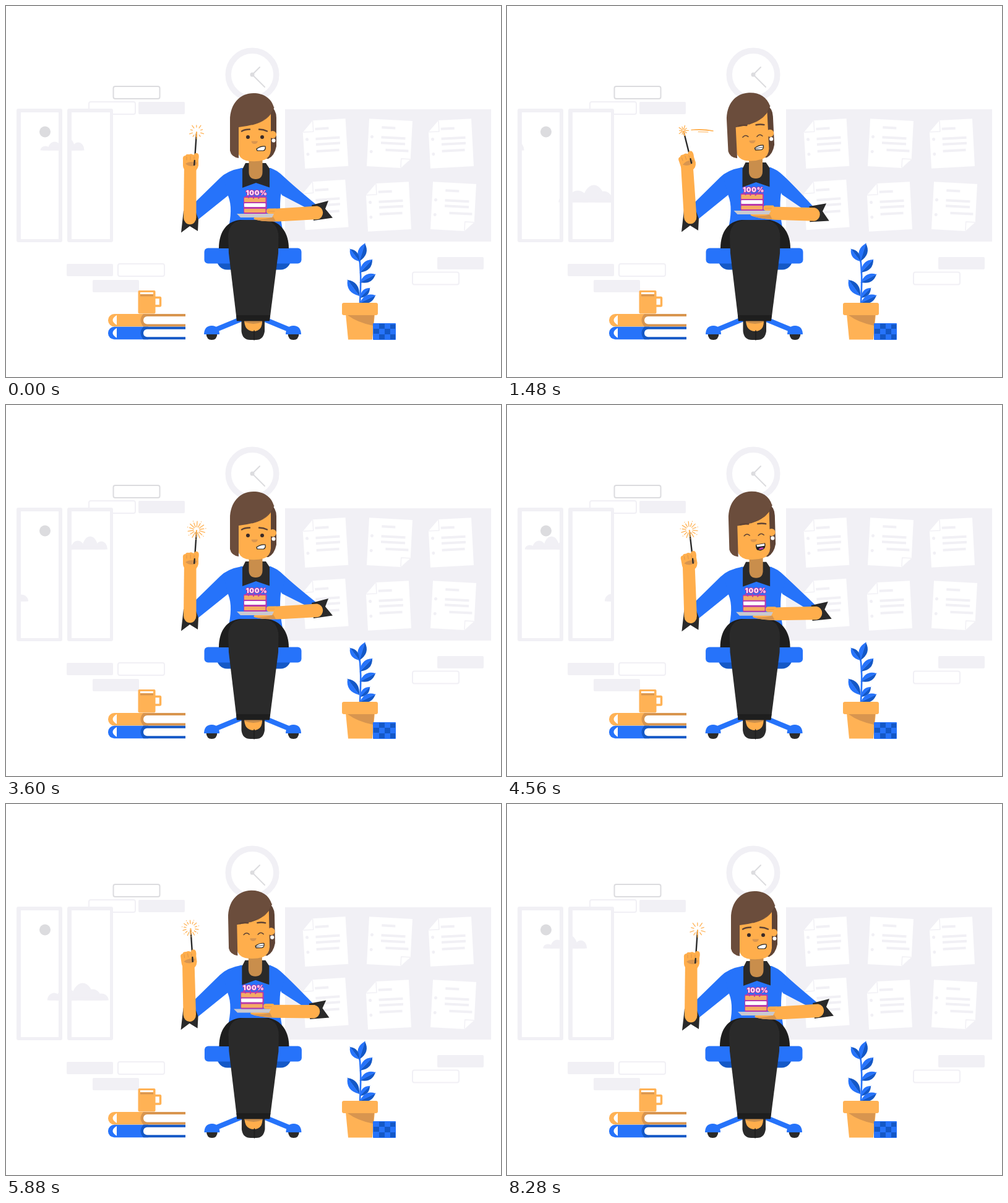
Write an HTML page with a canvas that moves like this. It is 800 px wide and 600 px high and loops after 8.32 s.

```html
<!DOCTYPE html>
<html lang="en">
<head>
<meta charset="utf-8">
<title>Office celebration</title>
<style>
html, body { margin: 0; width: 100%; height: 100%; overflow: hidden; background: #fff; }
canvas { display: block; width: 800px; height: 600px; }
</style>
</head>
<body>
<canvas id="stage" width="800" height="600"></canvas>
<script>
const ctx = document.getElementById('stage').getContext('2d');
const CYCLE = 4160, STEP = 40;
const PALE = '#f1f0f5', GREY = '#dcdcdf', BLUE = '#2673fa', NAVY = '#1458c6';
const BLACK = '#2a2a2a', DARK = '#1e1e1e', SKIN = '#ffae4c', SHADE = '#c98e4c';
const ORANGE = '#ffb255', TAN = '#d8954f', HAIR = '#6b4d3c', HAIR2 = '#5e4335', PINK = '#b93aab';

// ---- helpers ----
function fill(d, color) { ctx.fillStyle = color; ctx.fill(new Path2D(d)); }
function line(d, color, w, cap = 'round') {
  ctx.strokeStyle = color; ctx.lineWidth = w; ctx.lineCap = cap; ctx.lineJoin = 'round';
  ctx.stroke(new Path2D(d));
}
function box(x, y, w, h, color, r = 0) {
  ctx.beginPath(); ctx.roundRect(x, y, w, h, r); ctx.fillStyle = color; ctx.fill();
}
function frame(x, y, w, h, color, lw, r = 0) {
  ctx.beginPath(); ctx.roundRect(x, y, w, h, r);
  ctx.strokeStyle = color; ctx.lineWidth = lw; ctx.stroke();
}
function dot(x, y, r, color) {
  ctx.beginPath(); ctx.arc(x, y, r, 0, 7); ctx.fillStyle = color; ctx.fill();
}
function group(x, y, draw) { ctx.save(); ctx.translate(x, y); draw(); ctx.restore(); }
function turn(deg, x, y) {
  ctx.translate(x, y); ctx.rotate(deg * Math.PI / 180); ctx.translate(-x, -y);
}
// eased interpolation through [time, value] pairs
function ease(t, keys) {
  if (t <= keys[0][0]) return keys[0][1];
  for (let i = 1; i < keys.length; i++) {
    const [a, u] = keys[i - 1], [b, v] = keys[i];
    if (t <= b) { const k = (t - a) / (b - a); return u + (v - u) * k * k * (3 - 2 * k); }
  }
  return keys[keys.length - 1][1];
}
const lean = (s, left, right) => s < 0 ? -s * left : s * right;

// ---- room ----
function paper(x, y, deg, topFold) {
  group(x, y, () => {
    turn(deg, 0, 0);
    fill(topFold ? 'M-18-39H35V38H-35V-21Z' : 'M-35-38H35V24L20 39H-35Z', '#fff');
    line(topFold ? 'M-18-38V-21H-34' : 'M34 24H20V38', PALE, 1.5);
    const left = topFold ? -15 : -14;
    [[-25, 22], [-9, 39], [0, 39], [11, 37]].forEach(([ly, w], i) => {
      box(left + (i === 3 && !topFold ? 8 : 0), ly - 2, w, 4, PALE);
    });
    dot(-29, -9, 2.5, PALE); dot(-29, 15, 2.5, PALE);
  });
}

function cloud(x, y, bumps, width) {
  ctx.fillStyle = PALE;
  for (const [bx, rx, ry] of bumps) {
    ctx.beginPath(); ctx.ellipse(x + bx, y, rx, ry, 0, Math.PI, 2 * Math.PI); ctx.fill();
  }
  box(x + 3, y - 5, width - 6, 5, PALE, [3, 3, 0, 0]);
}

function windows(t) {
  box(17, 166, 74, 216, PALE, 3);
  box(99, 166, 74, 216, PALE, 3);
  box(24, 172, 61, 205, '#fff');
  box(106, 172, 62, 205, '#fff');
  ctx.save();
  ctx.beginPath(); ctx.rect(24, 172, 61, 205); ctx.rect(106, 172, 62, 205); ctx.clip();
  dot(63, 203.5, 9, GREY);
  cloud(185.5 - 0.069 * t, 317.5, [[11, 11, 12], [31, 17, 19], [57, 18, 28], [73, 15, 18], [87, 12, 11]], 99);
  const late = t < 2080 ? t + CYCLE : t;
  cloud(93 - 0.0668 * (late - 3600), 233.5, [[8, 8, 7], [23, 11, 14], [43, 13, 21], [61, 10, 13]], 71);
  ctx.restore();
}

function room(t) {
  frame(173.5, 130, 75, 20, GREY, 2, 3);
  frame(134, 155, 75, 20, PALE, 2, 3);
  box(214, 155, 75, 20, PALE, 2);
  box(98, 417, 75, 20, PALE, 2);
  frame(181, 417, 75, 20, PALE, 2, 3);
  box(140, 443, 75, 20, PALE, 2);
  box(697, 406, 75, 20, PALE, 2);
  frame(657, 430.5, 75, 20, PALE, 2, 3);
  windows(t);

  ctx.beginPath(); ctx.arc(398, 111, 38.8, 0, 7);
  ctx.strokeStyle = PALE; ctx.lineWidth = 9.5; ctx.stroke();
  line('M410 99L398 111L418 131', GREY, 2);
  dot(398, 111, 3.5, GREY);

  box(451, 167, 333, 214, PALE);
  paper(516, 223, -3.5, true);
  paper(620, 222, 3, false);
  paper(719, 223, -3, true);
  paper(516, 322, -4, true);
  paper(618, 325, -3, true);
  paper(723, 324, 3, false);
}

function book(y, main, shade) {
  box(165, y, 65, 20.5, main, [10, 0, 0, 10]);
  fill(`M222 ${y}H290V${y + 20.5}H222Q213 ${y + 10} 222 ${y}Z`, shade);
  box(222, y + 4, 68, 12.5, '#fff', [6, 0, 0, 6]);
  fill(`M179 ${y + 2}Q166 ${y + 10} 179 ${y + 18}Z`, '#fff');
}

function leaf(x, y, u, v) {
  const nx = (y - v) * 0.45, ny = (u - x) * 0.45, mx = x + (u - x) * 0.55, my = y + (v - y) * 0.55;
  fill(`M${x} ${y}Q${mx + nx} ${my + ny} ${u} ${v}Z`, NAVY);
  fill(`M${x} ${y}Q${mx - nx} ${my - ny} ${u} ${v}L${x} ${y}Z`, BLUE);
  line(`M${x} ${y}L${u} ${v}`, BLUE, 1);
}

function props() {
  book(498, ORANGE, TAN);
  book(518.8, BLUE, NAVY);
  box(213.5, 460, 28, 37.5, ORANGE, 2);
  box(217, 463, 21, 3, '#fff');
  box(217, 466.5, 21, 3, TAN);
  frame(239, 471.5, 10.5, 13.5, ORANGE, 3.5, 1);

  line('M572 481C573 455 575 430 570 400', BLUE, 2.6);
  leaf(571, 413, 580, 384);
  leaf(571, 413, 556, 393);
  leaf(572, 431, 592, 410);
  leaf(572, 447, 597, 434);
  leaf(571, 469, 552, 443);
  leaf(572, 472, 588, 456);
  leaf(572, 480, 597, 468);
  fill('M549 498H596L592 539.5H553Z', ORANGE);
  fill('M552 500H595L593.5 517Q568 512 552 500Z', TAN);
  box(543, 480, 58, 20, ORANGE, 3);

  box(593, 513, 37, 27, BLUE, 1);
  for (const [x, y, w, h] of [[603, 514, 9, 8], [612, 522, 9, 9], [594, 522, 9, 8], [603, 531, 9, 8], [621, 515, 8, 7], [621, 531, 8, 8]])
    box(x, y, w, h, NAVY);
}

// ---- character ----
function chair() {
  box(341, 408, 119, 18.5, NAVY, [0, 0, 16, 16]);
  box(320.5, 391.5, 157, 25, BLUE, 6);
  line('M340 523L386 504M457 523L411 504', BLUE, 8);
  for (const x of [332.5, 464.5]) {
    fill(`M${x - 9} 530H${x + 9}Q${x + 8.5} 540 ${x} 540Q${x - 8.5} 540 ${x - 9} 530Z`, BLACK);
    fill(`M${x - 12.5} 531Q${x - 12} 517 ${x} 517Q${x + 12} 517 ${x + 12.5} 531Z`, BLUE);
  }
}

function legs() {
  fill('M344 392C344 365 357 348 378 346H424C445 350 457 368 457 392Z', DARK);
  fill('M380.5 508H418V526Q416 540 404 540H395Q382 540 380.5 526Z', BLACK);
  fill('M385 507H414Q415 526 400 526Q385 526 385 507Z', SKIN);
  fill('M385 507H414V511Q400 517 385 511Z', SHADE);
  line('M401 525V540', DARK, 1.5);
  fill('M359 372Q360 346 388 346H414Q440 347 440.5 374L440 400L426 509H373L360 400Z', BLACK);
  fill('M372 500H427L425.5 509.5H373Z', DARK);
}

function torso(ex, ey, cx, cy) {
  // sleeves reach to both elbows, so their far ends follow the forearms
  fill(`M381 262Q358 266 346 278L${304 + ex} ${319 + ey}L${296 + ex} ${344 + ey}L${311 + ex} ${345 + ey}L362 304Z`, BLUE);
  fill(`M426 262Q437 264 450 277Q465 291 ${501 + cx} ${321 + cy}L${492 + cx} ${330 + cy}L446 306Z`, BLUE);
  fill('M380 262H428L452 281L444 306C442 324 443 340 447 362H359C364 340 365 322 359 307L352 280Z', BLUE);
  fill('M387 254H420L426 263V293.5L404 286L382 294V264Z', BLACK);
  fill('M392.5 245H414.5V269Q414 280 403.5 280Q393 280 392.5 269Z', SHADE);
}

function mouth(t) {
  const open = t > 300 && t < 1320;
  if (open) {
    fill('M405 227L420 225Q422 235 412 237L407 236Q404 232 405 227Z', DARK);
    fill('M406 227.5L419 226V229.5L407 231Z', '#fff');
    fill('M409 235Q413 230 418 233Q415 237 409 235Z', PINK);
  } else {
    const d = 'M405 231Q412 226 419 227Q420 233 416 234L406 234Z';
    fill(d, '#fff');
    line(d, DARK, 1.2);
    if (t > 1320 && t < 2800) line('M406 232L418 230', DARK, 0.8);
  }
}

function face(t) {
  const laugh = t > 200 && t < 2080, half = t >= 2080 && t < 2240;
  const lift = ease(t, [[120, 0], [300, -6], [2000, -6], [2300, 0]]);
  const brow = laugh ? 1 : 3.5;
  line(`M381 ${199 + brow + lift}Q386 ${198 + lift + brow * 0.4} 394 ${199.5 + lift}`, HAIR2, 2.4);
  line(`M409 ${199.5 + lift}Q416 ${198 + lift + brow * 0.4} 422 ${199 + brow + lift}`, HAIR2, 2.4);
  for (const x of [391, 414]) {
    if (laugh) line(`M${x - 4.5} 212.5Q${x} 207.5 ${x + 4.5} 212`, HAIR2, 1.5);
    else if (half) {
      line(`M${x - 4} 210.5H${x + 4}`, HAIR2, 1.3);
      fill(`M${x - 2.5} 211H${x + 2.5}Q${x} 215 ${x - 2.5} 211Z`, HAIR2);
    } else dot(x, 212, 3, '#3a2a28');
  }
  fill('M396.5 218.5H407Q406 223 401.5 223Q397 223 396.5 218.5Z', TAN);
  mouth(t);
}

function head(t) {
  fill('M426 161Q437 167 437 181V227Q434 242 424 247H405V161Z', HAIR2);
  fill('M375 180V236Q377 247 388 250Q403 253 417 249Q427 245 428 233V165H375Z', SKIN);
  dot(431, 208, 6, SKIN);
  fill('M362 195V185C362 158 378 141 400 141C416 141 429 149 433 164Q425 191 376 196V246Q364 244 362 234Z', HAIR);
  line('M433 164Q427 185 398 192', HAIR2, 0.8);
  dot(432.5, 217.5, 3.1, '#fff');
  face(t);
}

function forearm() {
  fill('M494 322L521 315L516 328L528 342.5L497 347Z', BLACK);
  fill('M431 328L503 323.5A11 11 0 0 1 504 345L440 348.5Q412 349 401 345Q399 342 404 341.5L430 341Z', SKIN);
  fill('M403 345Q420 345 432 341L436 348Q414 349 403 345Z', TAN);
}

function cake() {
  fill('M373 336H433L430 342H379Z', '#c9c9d0');
  box(384, 308, 37.5, 28, PINK, 2);
  box(385, 310, 34.5, 7, '#f5ac63', 1);
  box(385, 319, 34.5, 6, '#fff', 1);
  box(385, 328, 34.5, 6, '#f5ac63', 1);
  line('M389 307L392 310M400 307V311M411 307L408 311', PINK, 2);
  box(421, 327.5, 17, 8.5, SKIN, [4, 2, 2, 4]);
  line('M423 332H434', TAN, 0.8);
  ctx.font = '900 10.8px Inter, "Open Sans", sans-serif';
  ctx.letterSpacing = '0.8px';
  ctx.textAlign = 'center'; ctx.textBaseline = 'alphabetic'; ctx.lineJoin = 'round';
  ctx.strokeStyle = PINK; ctx.lineWidth = 2;
  ctx.strokeText('100%', 405, 305.5);
  ctx.fillStyle = '#ffe9f8';
  ctx.fillText('100%', 405, 305.5);
}

function sparkle(t) {
  const p = (t / (CYCLE / 9) + 0.85) % 1;
  const inner = ease(p, [[0, 2], [0.13, 2.5], [0.19, 4], [0.52, 9], [0.64, 5], [0.85, 7], [1, 9]]);
  const outer = ease(p, [[0, 8], [0.13, 9], [0.19, 10.5], [0.52, 12], [0.64, 14], [0.85, 12], [1, 12]]);
  const n = p > 0.45 && p < 0.75 ? 14 : 10;
  for (let i = 0; i < n; i++) {
    const a = i / n * 2 * Math.PI + 0.3, c = Math.cos(a), s = Math.sin(a);
    const r = outer - (i % 2) * 2;
    line(`M${c * inner} ${s * inner}L${c * r} ${s * r}`, ORANGE, 1.3);
    if (n === 14 && i % 2) dot(c * (r + 3), s * (r + 3), 0.7, ORANGE);
  }
}

function wandArm(armDeg, handDeg, t) {
  fill('M287 331L283 366.5L297 356L310 364L311 345L306 331Z', BLACK);
  ctx.save();
  turn(armDeg, 297, 343);
  fill('M288 252H307.5V342A10 11 0 0 1 287 342Z', SKIN);
  turn(handDeg - armDeg, 298, 252);
  line('M304.5 256L307.8 207', BLACK, 2.4);
  line('M307.6 211L308 204', ORANGE, 2.2);
  fill('M286 249Q285 242 290 242Q291 239 296 240Q300 238 303 241Q306 236 310 238.5Q313 241 311 249L311 258Q309 268 301 268H294Q286 265 286 258Z', SKIN);
  line('M292 244V249M298 243V249M304 244V248', TAN, 0.9);
  fill('M290 255Q297 250 309 253Q308 259 300 259Q294 259 290 255Z', TAN);
  line('M304.2 257L304.8 250', BLACK, 2.4);
  group(308, 203, () => sparkle(t));
  ctx.restore();
}

function swoosh(t) {
  const mark = (x, y, dir) => {
    const x2 = x + 35 * dir;
    fill(`M${x} ${y}Q${x + 18 * dir} ${y - 3} ${x2} ${y + 2}Q${x + 18 * dir} ${y + 0.5} ${x} ${y}Z`, ORANGE);
    line(`M${x} ${y}Q${x + 18 * dir} ${y - 2} ${x2} ${y + 1.5}`, ORANGE, 1.4);
    line(`M${x + 11 * dir} ${y + 3}L${x + 27 * dir} ${y + 3.5}`, ORANGE, 1);
  };
  if ((t >= 520 && t < 640) || (t >= 1360 && t < 1540)) mark(298, 200.5, 1);
  if (t >= 900 && t < 1120) mark(320, 205.5, -1);
}

function woman(t) {
  const s = ease(t, [[200, 0], [560, -1], [920, 1], [1100, 1], [1440, -1], [1500, -1], [1900, 0]]);
  const rise = ease(t, [[0, 0], [900, -0.5], [1500, -1], [2160, -2], [2440, -2], [3600, -1], [CYCLE, 0]]);
  const cx = ease(t, [[200, 0], [560, -5], [880, 4.5], [1080, -3], [1480, -6.5], [2160, -1], [2440, 0]]);
  const cy = ease(t, [[0, 0], [880, -3], [1080, -3.5], [1480, -5], [2160, -3], [2440, -2], [3600, -2], [CYCLE, 0]]);
  const elbowY = ease(t, [[0, 0], [560, 3], [1480, 3], [2160, -2], [2440, -2.5], [3600, -2], [CYCLE, 0]]);
  const headY = ease(t, [[0, 0], [800, -2.5], [1080, -2], [1480, -1], [2160, -2], [2440, 4], [2900, -3], [3600, -1], [CYCLE, 0]]);
  const seat = lean(s, 1, 3), bodyX = lean(s, -1.5, 2);
  const armX = lean(s, -1, 6), armY = rise + lean(s, 0, 1);

  group(seat, 0, chair);
  group(bodyX, rise, () => torso(armX - bodyX, armY - rise, cx - bodyX, elbowY - rise));
  group(bodyX + lean(s, -2, 1), headY, () => {
    turn(lean(s, -2.8, 0.6), 402, 255);
    head(t);
  });
  group(seat, 0, legs);
  // the forearm pivots at the elbow so that the hand stays under the plate
  group(cx, elbowY, () => {
    turn((elbowY - cy) / 92 * 180 / Math.PI, 506, 334);
    forearm();
  });
  group(cx, cy, cake);
  group(armX, armY, () => wandArm(lean(s, -4, 7), lean(s, -18, 8.5), t));
  swoosh(t);
}

function draw(now) {
  const t = Math.floor(now / STEP) * STEP % CYCLE;
  ctx.fillStyle = '#fff';
  ctx.fillRect(0, 0, 800, 600);
  room(t);
  props();
  woman(t);
}

const start = performance.now();
function tick() {
  draw(performance.now() - start);
  requestAnimationFrame(tick);
}
tick();
</script>
</body>
</html>
```
